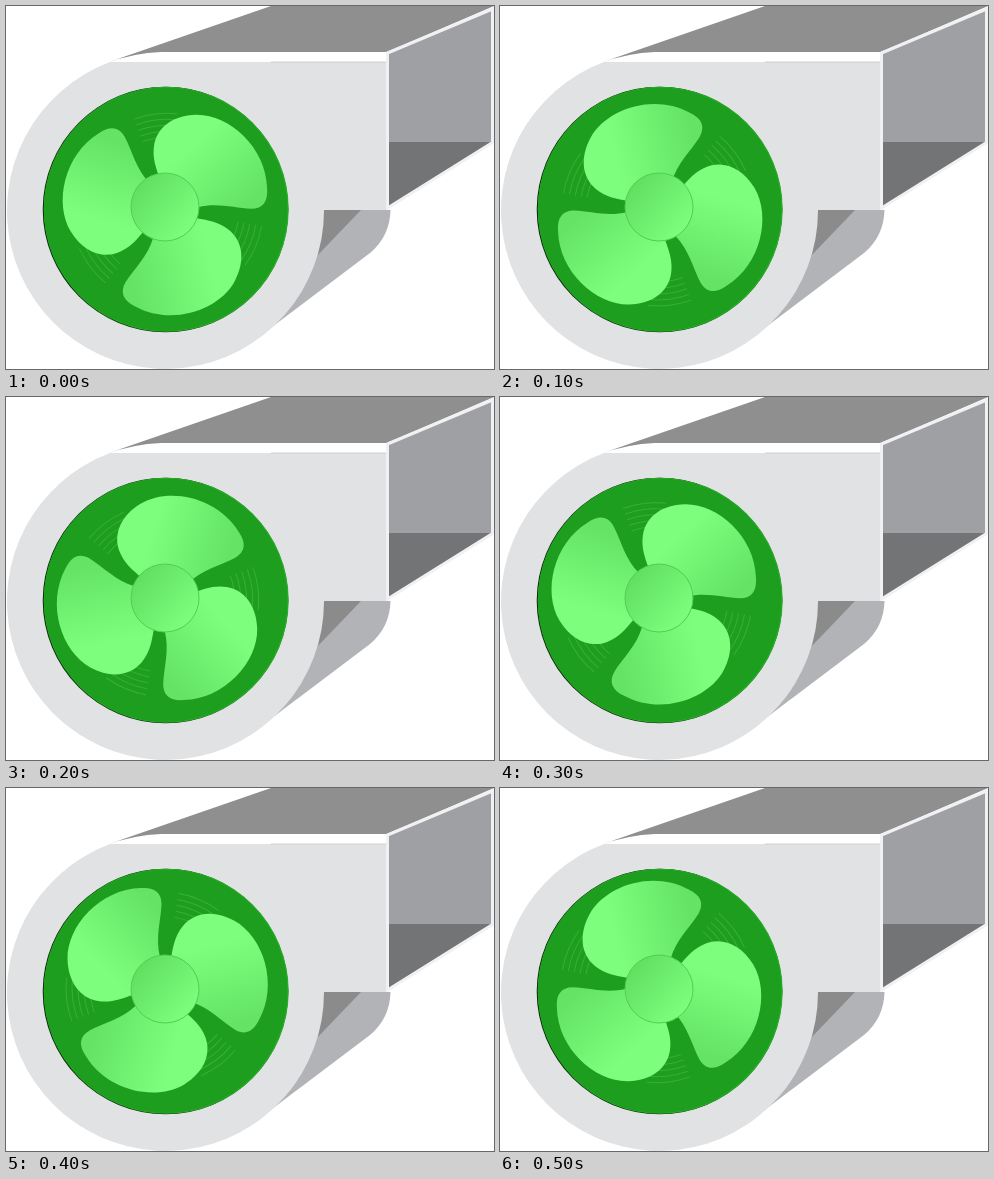
An HTML page for the animation above (600 ms loop, 488 by 363 pixels).

```html
<!DOCTYPE html>
<html lang="en">
<head>
<meta charset="utf-8">
<title>Blower fan</title>
<style>
  html, body { margin: 0; width: 100%; height: 100%; overflow: hidden; background: #fff; }
  svg { display: block; width: 100vw; height: 100vh; }
</style>
</head>
<body>
<svg viewBox="0 0 488 363">
  <defs>
    <linearGradient id="bladeFill" gradientUnits="userSpaceOnUse" x1="15" y1="-75" x2="80" y2="-5">
      <stop offset=".15" stop-color="#7dff7d"/>
      <stop offset="1" stop-color="#64e364"/>
    </linearGradient>
    <linearGradient id="hubFill" x1=".1" y1=".1" x2=".9" y2=".8">
      <stop offset="0" stop-color="#5fdd5f"/>
      <stop offset="1" stop-color="#7dff7d"/>
    </linearGradient>
    <path id="blade" fill="url(#bladeFill)"
      d="M0 0L-7-30C-11-41-15-51-13-64C-10-82 6-94 29-94.5C62-95 99-62 100-21C101-8 96-.5 84-.5C68-1 50-7 31-2Z"/>
    <g id="streaks" fill="none" stroke="#46bd46" stroke-opacity=".6"></g>
  </defs>

  <!-- duct -->
  <path fill="#8f8f90" d="M100 57L265 0H488L381 46H155Q128 47 100 57Z"/>
  <path fill="#9fa0a4" d="M382 47L487 3V137L382 202Z"/>
  <path fill="#737476" d="M382 136H487V137L382 202Z"/>
  <path fill="none" stroke="#f1f1f3" stroke-width="3" d="M381.5 47L486.500 3V136.500L381.500 202Z"/>

  <!-- housing -->
  <path fill="#b2b3b7" d="M318 204H384.500Q384 230 364 247L262 324Z"/>
  <path fill="#8b8b8c" d="M316 204H355L308 253Z"/>
  <path fill="#e1e2e4" d="M104 56H380V204H318A158.500 158.500 0 1 1 104 56Z"/>
  <path fill="none" stroke="#cfd0d2" d="M265 56H380"/>

  <!-- opening -->
  <circle cx="159.500" cy="203.500" r="122.800" fill="#0b2b0b"/>
  <circle cx="160.200" cy="203.300" r="122.500" fill="#27b027"/>
  <circle cx="159.700" cy="203.200" r="121.800" fill="#1e9e1e"/>

  <g id="fan"></g>
  <circle cx="159" cy="201" r="34" fill="url(#hubFill)" stroke="#50cf50"/>
</svg>
<script>
  const byId = id => document.getElementById(id);
  const fan = byId('fan');
  const poses = [0, 60, 90, 120, 150, 180];
  const hold = 100;

  const polar = (r, deg) => {
    const a = deg * Math.PI / 180;
    return `${r * Math.cos(a)} ${r * Math.sin(a)}`;
  };

  for (let r = 72; r <= 96; r += 6)
    byId('streaks').innerHTML += `<path d="M${polar(r, -110)}A${r} ${r} 0 0 1 ${polar(r, -84)}"/>`;

  for (const id of ['streaks', 'blade'])
    for (const turn of [0, 120, 240])
      fan.innerHTML += `<use href="#${id}" transform="rotate(${turn})"/>`;

  // The blades sit slightly off the axle, so they wobble as they turn.
  function draw(now) {
    const angle = poses[Math.floor(now / hold) % poses.length];
    fan.setAttribute('transform', `translate(159 201) rotate(${angle}) translate(2.1 2.3)`);
    requestAnimationFrame(draw);
  }
  draw(performance.now());
</script>
</body>
</html>
```
